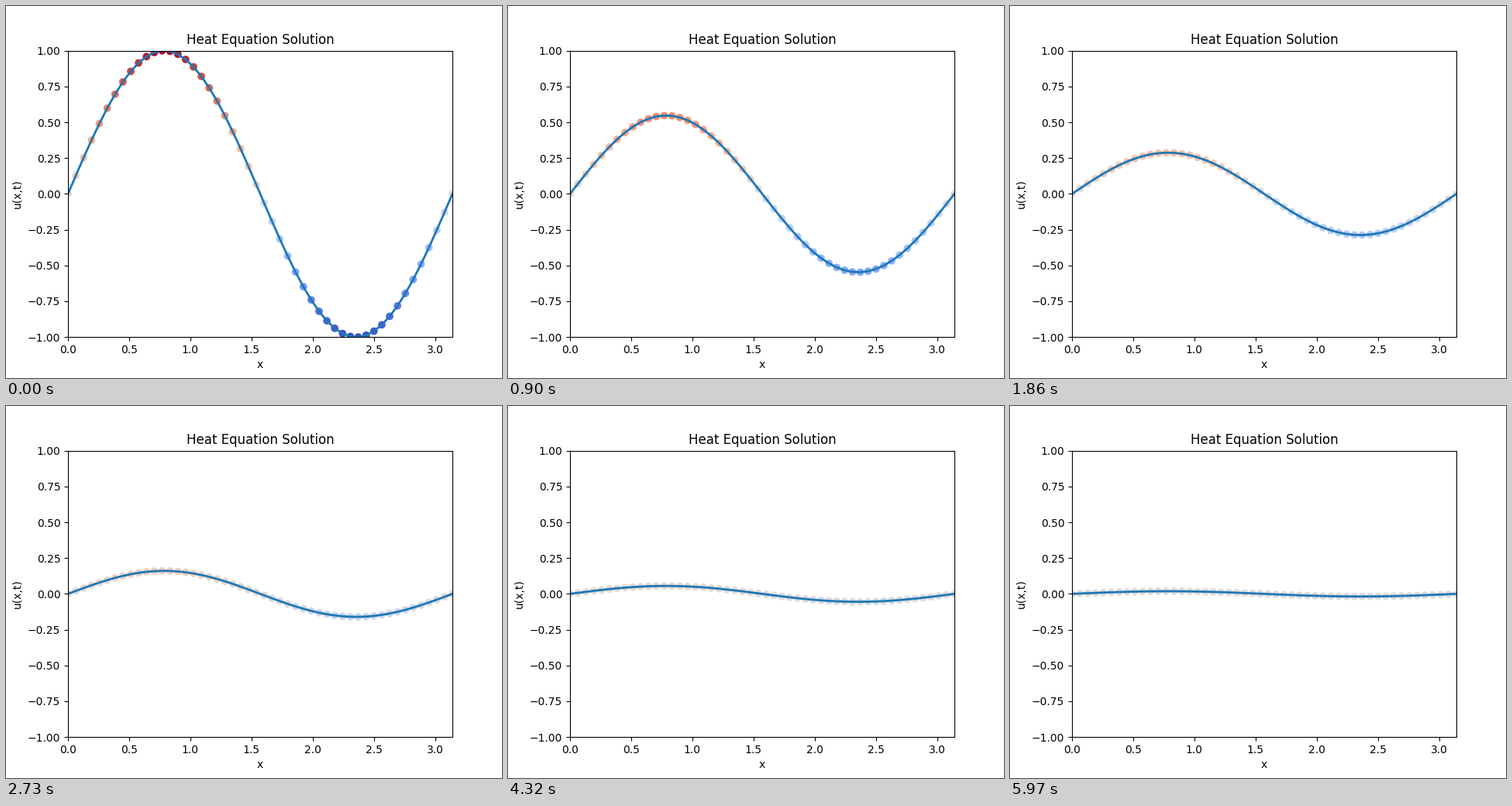
Write a matplotlib script that moves like this. It is 640 px wide and 480 px high and loops after 6000 ms.

```python
import numpy as np
import matplotlib.pyplot as plt
from matplotlib.animation import FuncAnimation

FRAMES = 200
INTERVAL = 30  # ms

x = np.linspace(0, np.pi, 50)
times = np.linspace(0, 1, FRAMES)


def heat(t):
    """Solution of u_t = u_xx with u(x, 0) = sin(2x)."""
    return np.exp(-4 * t) * np.sin(2 * x)


fig, ax = plt.subplots(figsize=(6.4, 4.8), dpi=100)
ax.set(xlim=(0, np.pi), ylim=(-1, 1), xlabel="x", ylabel="u(x,t)",
       title="Heat Equation Solution")

u0 = heat(0)
line, = ax.plot(x, u0, lw=2)
dots = ax.scatter(x, u0, c=u0, cmap="coolwarm", vmin=-1, vmax=1)


def update(frame):
    u = heat(times[frame])
    line.set_ydata(u)
    dots.set_offsets(np.column_stack([x, u]))
    dots.set_array(u)
    return line, dots


anim = FuncAnimation(fig, update, frames=FRAMES, interval=INTERVAL,
                     repeat=True, repeat_delay=0)
plt.show()
```
